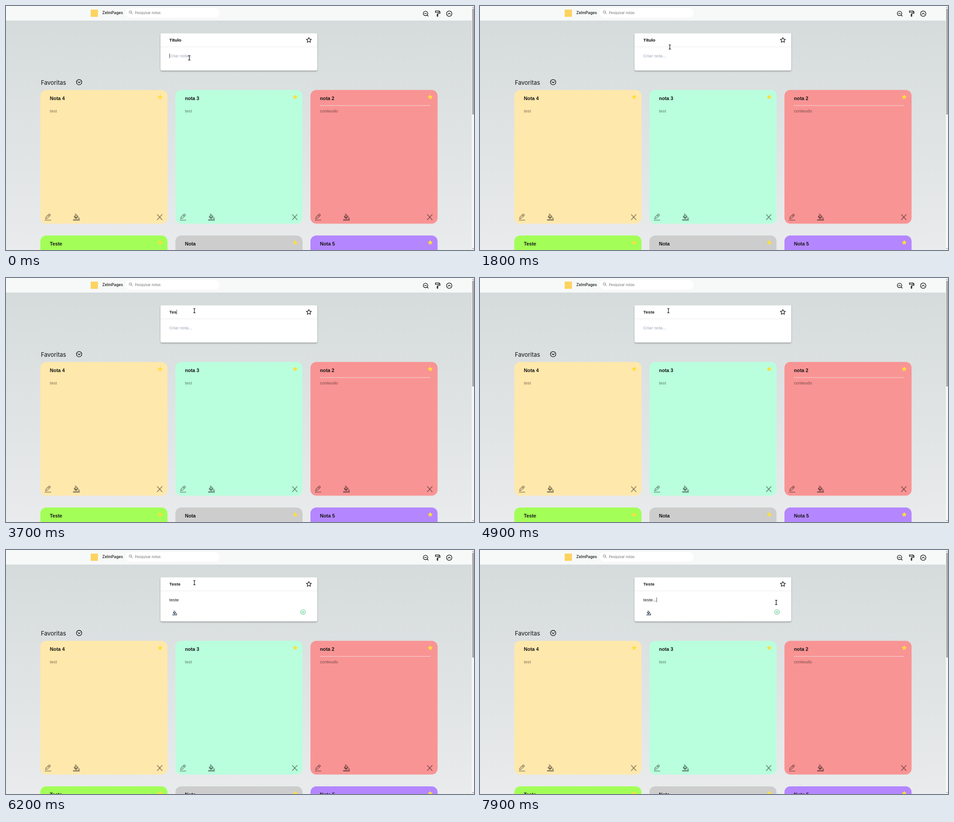
These frames come from a looping animation (1033 px wide and 542 px high, 8 s). An HTML page:

```html
<!DOCTYPE html>
<html lang="pt">
<head>
<meta charset="utf-8">
<title>Notas</title>
<style>
html, body { margin: 0; width: 100%; height: 100%; overflow: hidden; }
svg { display: block; width: 1033px; height: 542px; }
text { font: 9.68px "Liberation Sans", Arial, sans-serif; white-space: pre; }
.ui { font-family: Inter, sans-serif; }
.bold { font-weight: 700; }
.line { fill: none; stroke: #111; stroke-width: 1.3; stroke-linecap: round; stroke-linejoin: round; }
.tool { opacity: .52; }
#card { filter: drop-shadow(0 2px 1.6px rgba(0, 0, 0, .28)); }
</style>
</head>
<body>
<svg viewBox="0 0 1033 542">
  <defs>
    <linearGradient id="sky" x2="0" y2="1">
      <stop stop-color="#d4dada"/><stop offset="1" stop-color="#e9ebec"/>
    </linearGradient>
    <path id="star" d="M0-5.6 1.7-2 5.6-1.6 2.7 1.1 3.5 5 0 3 -3.5 5 -2.7 1.1 -5.6-1.6 -1.7-2Z" stroke-linejoin="round"/>
    <g id="pencil" fill="none" stroke="#000" stroke-width="1.3" stroke-linejoin="round">
      <path d="M-7 7H7"/>
      <path d="M-5.2 3.8-4.5.6 2.2-6.2Q3.3-7 4.3-6L4.9-5.3Q5.7-4.3 4.9-3.5L-1.9 3.2ZM.6-4.6 3.3-1.9"/>
    </g>
    <g id="bucket">
      <path d="M-7.2 5.5H7.5V8H-7.2Z"/>
      <path d="M-3.4-6.8-2.3-7.8 4.3-1.2Q5-.5 4.3.2L.4 4Q-.7 4.9-1.8 4L-5.3.5Q-6.1-.4-5.2-1.3L-1.4-4.9ZM-.4-3.6-3.5-.5H2.6Z" fill-rule="evenodd"/>
      <path d="M5.7 1Q9 4.6 5.7 4.8 2.6 4.6 5.7 1Z"/>
    </g>
    <path id="cross" d="M-5.3-5.8 5.3 5.8M5.3-5.8-5.3 5.8" stroke="#000" stroke-width="1.5" stroke-linecap="round"/>
  </defs>

  <rect width="1033" height="542" fill="url(#sky)"/>

  <g id="page">
    <text class="ui" x="77" y="174.5" style="font-size:12.91px" fill="#111">Favoritas</text>
    <g class="line"><circle cx="161.4" cy="169.2" r="5.9"/><path d="M158.8 168.2 161.4 170.8 164 168.2"/></g>
    <g id="notes"></g>
  </g>

  <g id="card">
    <rect id="sheet" x="341" y="60.8" width="346" height="82.4" rx="3.2" fill="#fff"/>
  </g>
  <path d="M341 90.8H687" stroke="#e9ebec"/>
  <use href="#star" x="668.5" y="75.7" fill="none" stroke="#111" stroke-width="1.2"/>
  <text id="head" class="bold" x="360.5" y="79"></text>
  <text id="body" x="360.5" y="114.2"></text>
  <g id="actions">
    <use href="#bucket" transform="translate(372.3 139.4) scale(.7)" fill="#475569"/>
    <g class="line" style="stroke:#55c987;stroke-width:1.1"><circle cx="655.6" cy="138" r="5.2"/><path d="M653 138H658.2M655.6 135.4V140.6"/></g>
  </g>
  <path id="caret" d="M0 0V10.6" stroke="#222" stroke-width=".8"/>

  <rect width="1028" height="32.3" fill="#f7f9f8"/>
  <rect x="187" y="8" width="16" height="16" fill="#fbd35f"/>
  <text class="ui" x="212.5" y="18.4" style="font-size:8.61px;font-weight:500" fill="#111">ZelmPages</text>
  <rect x="264" y="5" width="207" height="20.4" rx="10.2" fill="#fff"/>
  <g class="line" style="stroke:#777;stroke-width:1"><circle cx="274.5" cy="13.4" r="2.7"/><path d="M276.6 15.5 279.2 18"/></g>
  <text class="ui" x="284.5" y="17.8" style="font-size:7.53px" fill="#6f7275">Pesquisar notas</text>
  <g class="line">
    <circle cx="926" cy="16.6" r="4.9"/><path d="M923.8 16.6H928.2M929.6 20.2 932 22.5"/>
    <path d="M947.8 10.8H956.2V14.2H947.8ZM956.2 12.4H958V16.4L952.4 17.2V18.6M951.5 18.8H953.3V22.8H951.5Z"/>
    <circle cx="978.3" cy="17" r="5.9"/><path d="M975.7 18.2 978.3 15.6 980.9 18.2"/>
  </g>

  <rect x="1028" width="5" height="542" fill="#f5f6f6"/>
  <path d="M1029.3 4 1030.8 1.8 1032.3 4ZM1029.3 538 1030.8 540.2 1032.3 538Z" fill="#777"/>
  <rect id="thumb" x="1029" y="6" width="4" height="235" fill="#a9abab"/>

  <g id="mouse" fill="none">
    <path id="beam" d="M-2.4-5Q0-5 0-3.6 0-5 2.4-5M0-4V4M-2.4 5Q0 5 0 3.6 0 5 2.4 5" stroke="#fff" stroke-width="2.2"/>
    <use href="#beam" style="stroke:#111"/>
    <path d="M-2.4-5Q0-5 0-3.6 0-5 2.4-5M0-4V4M-2.4 5Q0 5 0 3.6 0 5 2.4 5" stroke="#111" stroke-width="1.2"/>
  </g>
</svg>
<script>
const $ = id => document.getElementById(id);
const LOOP = 8000, OPEN = 5000, GROW = 15.2;

const notes = [
  ["Nota 4", "test", "#ffe8ac"], ["nota 3", "test", "#b9ffdd"], ["nota 2", "conteudo", "#f99494"],
  ["Teste", "", "#a3ff57"], ["Nota", "", "#cdcdcd"], ["Nota 5", "", "#b486ff"]
];
$("notes").innerHTML = notes.map(([title, content, color], i) => `
  <g transform="translate(${75.8 + i % 3 * 298.1} ${i < 3 ? 186.5 : 509.7})">
    <rect width="280.6" height="297" rx="13" fill="${color}"/>
    <text class="bold" x="21" y="22.3" style="font-size:10.76px" fill="#151515">${title}</text>
    <use href="#star" x="264.4" y="15.6" fill="#ffdf3a"/>
    <path class="${i === 2 ? "" : "faint"}" d="M21 34.6H264.5" stroke="#f0e4e4" stroke-width=".9"/>
    <g class="tool">
      <text x="21" y="50.3">${content}</text>
      <use href="#pencil" x="16.8" y="282.2"/>
      <use href="#bucket" x="79.4" y="282"/>
      <use href="#cross" x="263.4" y="282.5"/>
    </g>
  </g>`).join("");

// Each track lists [start time, value...]; the latest started entry holds.
const mouse = [
  [0, 404.6, 115.2], [200, 406.6, 105.3], [1600, 409, 102], [1700, 414, 97], [1800, 419, 91],
  [1900, 421, 85], [2000, 417.5, 78], [2100, 415.2, 75], [2300, 415.8, 72.5], [7400, 416.6, 73],
  [7600, 455, 90], [7700, 520, 130], [7800, 595, 157], [7900, 653.8, 116.4]
];
const headTyped = [[0, 0], [3100, 1], [3400, 2], [3700, 3], [3900, 4], [4000, 5]];
const bodyTyped = [
  [0, 0], [5000, 1], [5100, 2], [5200, 3], [5400, 4], [5600, 5], [6400, 6], [6500, 7], [6700, 8]
];
const caret = [
  [0, "body"], [600, ""], [1200, "body"], [1700, ""], [2100, "head"], [4300, "body"],
  [4900, ""], [5000, "body"], [6200, ""], [6400, "body"], [7300, ""], [7900, "body"]
];
const at = (track, t) => track.filter(key => key[0] <= t).pop().slice(1);

function type(el, full, count, hint, hintColor) {
  el.textContent = count ? full.slice(0, count) : hint;
  el.setAttribute("fill", count ? "#1c1c1c" : hintColor);
  return 360.9 + (count ? el.getComputedTextLength() : 0);
}

function draw(t) {
  const open = t >= OPEN, [x, y] = at(mouse, t), [focus] = at(caret, t);
  const ends = {
    head: type($("head"), "Teste", at(headTyped, t)[0], "Título", "#000"),
    body: type($("body"), "teste...", at(bodyTyped, t)[0], "Criar nota...", "#97a3b6")
  };
  $("caret").style.display = focus ? "" : "none";
  if (focus) $("caret").setAttribute("transform", `translate(${ends[focus]} ${focus === "head" ? 70.3 : 105.4})`);
  $("mouse").setAttribute("transform", `translate(${x} ${y})`);
  $("page").setAttribute("transform", `translate(0 ${open ? GROW : 0})`);
  $("sheet").setAttribute("height", 82.4 + (open ? GROW : 0));
  $("actions").style.display = open ? "" : "none";
  $("thumb").setAttribute("height", open ? 233 : 235);
  document.querySelectorAll(".faint").forEach(el => el.style.opacity = open ? .35 : 0);
}

const start = performance.now();
(function tick() {
  draw((performance.now() - start) % LOOP);
  requestAnimationFrame(tick);
})();
</script>
</body>
</html>
```
